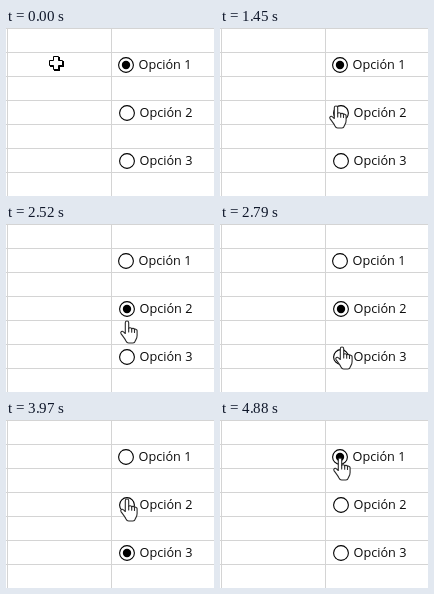
An HTML page that plays this animation: 208x168 px, repeating every 6.21 s.

```html
<!DOCTYPE html>
<html lang="es">
<head>
<meta charset="utf-8">
<title>Botones de opción</title>
<style>
  html, body { margin: 0; width: 100%; height: 100%; overflow: hidden; background: #fff; }
  svg { display: block; width: 208px; height: 168px; }
  text { font: 12.7px "Open Sans", "Noto Sans", sans-serif; fill: #0c0c0c; }
  .grid { stroke: #d4d4d4; fill: none; shape-rendering: crispEdges; }
  .ring { fill: #fff; stroke: #000; stroke-width: 1.1; }
  .pressed .ring { stroke-width: 2.6; }
  .dot { fill: #000; visibility: hidden; }
  .checked .dot { visibility: visible; }
</style>
</head>
<body>
<svg viewBox="0 0 208 168">
  <path class="grid" id="grid"/>
  <g id="options"></g>
  <g id="cross">
    <path d="M-2-6H4V-2H8V4H4V8H-2V4H-6V-2H-2Z" fill="#000"/>
    <path d="M-2.5-6.5H2.5V-2.5H6.5V2.5H2.5V6.5H-2.5V2.5H-6.5V-2.5H-2.5Z" fill="#fff" stroke="#000"/>
  </g>
  <g id="hand" stroke="#2a2a2a" stroke-width="1.1" stroke-linejoin="round" stroke-linecap="round">
    <path fill="#fff" d="M-1.7 12.5V1.7a1.7 1.7 0 0 1 3.4 0V7.5c0-1.1 3-1.1 3 .5c0-1 2.8-.8 2.8 .6c0-.8 2.6-.6 2.6 1V14.5c0 3-1.4 4-1.9 5.6C7.8 21.6 7 22 6 22H1.6C.2 22-.4 21.4-1 20C-2 17.5-4.4 15-6 12.6C-7 10.5-4.7 9.6-3.5 10.8Z"/>
    <path fill="none" d="M1.7 7.5V11M4.7 8V11.2M7.5 8.6V11.4"/>
  </g>
</svg>
<script>
const LOOP = 6210;
const ROW = 24;
const CONTROL_LEFT = 106;
const $ = id => document.getElementById(id);

const centre = i => ({ x: i ? 121 : 120, y: 37 + 2 * ROW * i });
const linear = u => u;
const easeOut = u => 1 - (1 - u) ** 1.5;

// Each move ends at an offset from the centre of an option
const home = { x: 50, y: 35 };
const moves = [
  { from: 790, to: 1440, option: 1, dx: -5.5, dy: -7.5, ease: easeOut },
  { from: 1440, to: 1610, option: 1, dx: -1.5, dy: -4, ease: linear },
  { from: 2360, to: 2910, option: 2, dx: 2, dy: 1.5, ease: linear },
  { from: 3690, to: 4300, option: 0, dx: -1, dy: 5, ease: easeOut },
  { from: 4320, to: 4520, option: 0, dx: -0.5, dy: 0.5, ease: linear }
];

const clicks = [
  { down: 1940, up: 2060, option: 1 },
  { down: 3210, up: 3390, option: 2 },
  { down: 4850, up: 4880, option: 0 }
];

let lines = 'M1.5 0V168M105.5 0V168';
for (let y = .5; y < 168; y += ROW) lines += `M0 ${y}H208`;
$('grid').setAttribute('d', lines);

$('options').innerHTML = [0, 1, 2].map(i => {
  const { x, y } = centre(i);
  return `<g><circle class="ring" cx="${x}" cy="${y}" r="7.4"/>
    <circle class="dot" cx="${x}" cy="${y}" r="4.2"/>
    <text x="${x + 12.5}" y="${y + 4}">Opción ${i + 1}</text></g>`;
}).join('');
const options = [...$('options').children];

function pointerAt(t) {
  let { x, y } = home;
  for (const m of moves) {
    const u = Math.min(1, Math.max(0, (t - m.from) / (m.to - m.from)));
    const end = centre(m.option), k = m.ease(u);
    x += (end.x + m.dx - x) * k;
    y += (end.y + m.dy - y) * k;
  }
  return { x, y };
}

function render(t) {
  let checked = 0, pressed = -1;
  for (const { down, up, option } of clicks) {
    if (t >= up) checked = option;
    else if (t >= down) pressed = option;
  }
  options.forEach((g, i) => {
    g.classList.toggle('checked', i === checked);
    g.classList.toggle('pressed', i === pressed);
  });

  const { x, y } = pointerAt(t);
  const over = x > CONTROL_LEFT;
  const place = `translate(${Math.round(x)} ${Math.round(y)})`;
  for (const [id, shown] of [['hand', over], ['cross', !over]]) {
    $(id).setAttribute('transform', place);
    $(id).style.display = shown ? '' : 'none';
  }
}

const start = performance.now();
function tick() {
  render((performance.now() - start) % LOOP);
  requestAnimationFrame(tick);
}
tick();
</script>
</body>
</html>
```
